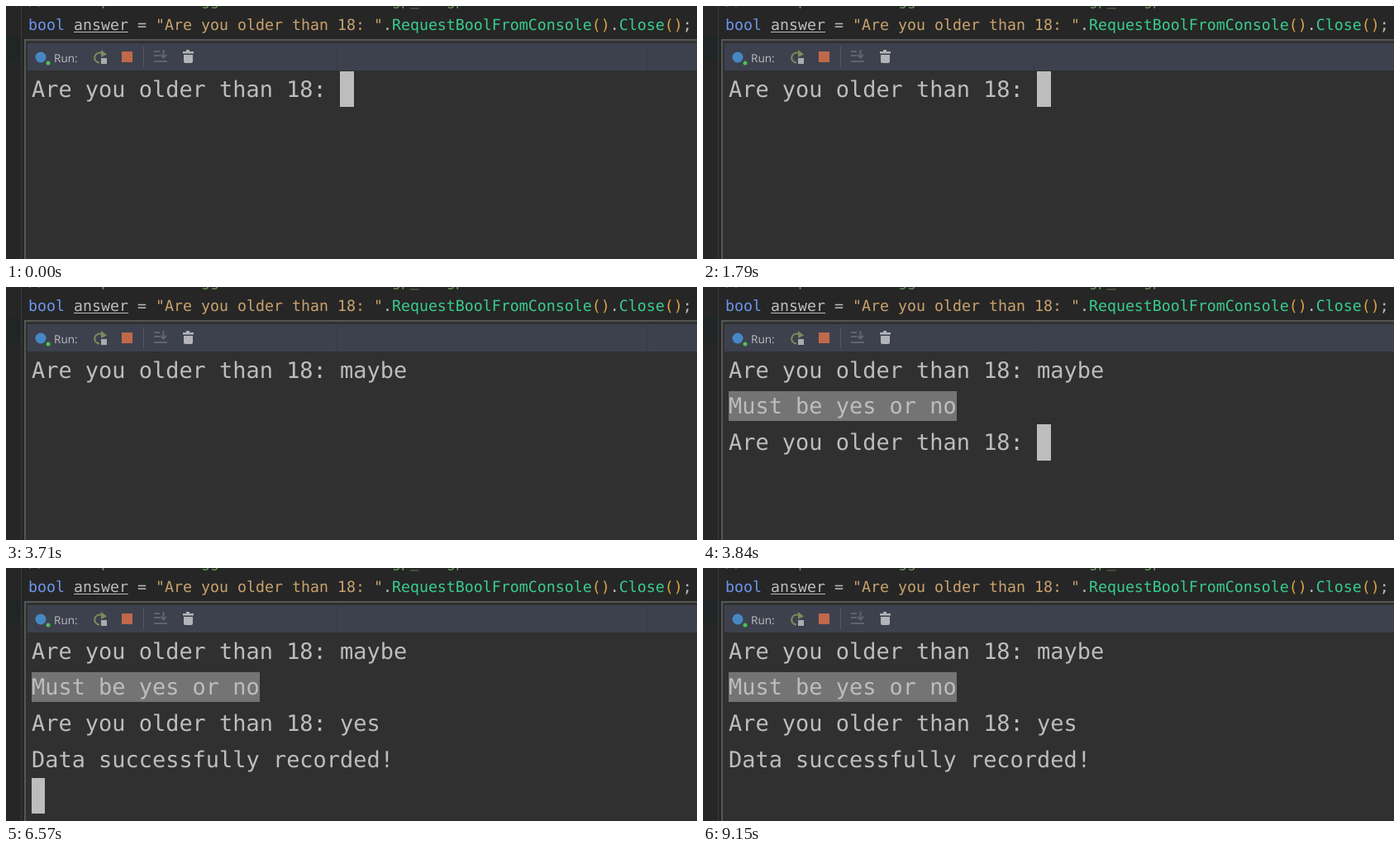
Recreate the animation shown at these times as an HTML page. Size 836 px wide and 306 px high, loop 9.22 s.

```html
<!DOCTYPE html>
<html lang="en">
<head>
<meta charset="utf-8">
<title>Console prompt</title>
<style>
  html, body { margin: 0; width: 100%; height: 100%; overflow: hidden; background: #262626; }
  svg { display: block; width: 836px; height: 306px; }
  text { white-space: pre; text-rendering: geometricPrecision; fill: #bdbdbd; }
  .code, .row { font-family: "DejaVu Sans Mono", monospace; }
  .code { font-size: 18.27px; }
  .row { font-size: 26.94px; }
  .label { font: 13.6px "Open Sans", "Noto Sans", sans-serif; }
  .keyword { fill: #6c95eb; }
  .string { fill: #c9a26d; }
  .method { fill: #39cc8f; }
  .paren { fill: #d9a343; }
  .comment { fill: #6f9a5c; }
</style>
</head>
<body>
<svg viewBox="0 0 836 306">
  <!-- editor -->
  <rect width="836" height="306" fill="#262626"/>
  <rect y="37" width="18" height="30" fill="#202626"/>
  <rect x="18" width="1" height="306" fill="#3b3b3b"/>
  <text class="code comment" x="27" y="-1">//      p          gg                   gp_   gp</text>
  <text class="code" x="27" y="29"><tspan class="keyword">bool</tspan> answer = <tspan class="string">"Are you older than 18: "</tspan>.<tspan class="method">RequestBoolFromConsole</tspan><tspan class="paren">()</tspan>.<tspan class="method">Close</tspan><tspan class="paren">()</tspan>;</text>
  <rect x="82" y="31" width="66" height="1" fill="#bdbdbd"/>

  <!-- console window -->
  <rect x="22" y="40" width="814" height="266" fill="#555656"/>
  <rect x="24" y="42" width="812" height="264" fill="#303030"/>
  <rect x="26" y="45" width="810" height="33" fill="#3d414e"/>
  <path d="M400.5 45V78M775.5 45V78" stroke="#373b47"/>

  <!-- toolbar -->
  <circle cx="42" cy="62" r="6.5" fill="#4688c4"/>
  <circle cx="51" cy="69" r="2.5" fill="#4fc04f"/>
  <text class="label" x="58" y="67.5">Run:</text>
  <g fill="none" stroke="#7d8a5c" stroke-width="2">
    <path d="M113 68.5A6 6 0 1 1 116.5 57.5"/>
  </g>
  <path d="M115 53L122 58.5L115 62Z" fill="#7d8a5c"/>
  <rect x="115" y="63" width="7" height="7" fill="#a9abad"/>
  <rect x="140" y="55" width="13" height="13" fill="#c0694a"/>
  <rect x="166" y="49" width="1" height="25" fill="#555962"/>
  <path d="M179 55H186M179 60H186M179 67H195M190.5 53V62M187 59L190.5 62.5L194 59" fill="none" stroke="#60646d" stroke-width="2"/>
  <path d="M214 55H218V53H222V55H227V57.5H214ZM215 59H226V67Q226 69 224 69H217Q215 69 215 67Z" fill="#b2b4b7"/>

  <!-- console output -->
  <rect id="mark" x="31" y="126" width="276" height="36" fill="#747474"/>
  <g id="rows"></g>
  <rect id="cursor" fill="#bdbdbd"/>
</svg>
<script>
  const LOOP = 9220;
  const ASK = "Are you older than 18: ";
  const RETRY = ASK + "maybe\nMust be yes or no\n" + ASK;
  const DONE = RETRY + "yes\nData successfully recorded!\n";

  // start time, console content, cursor shown
  const steps = [
    [0, ASK, 1], [200, ASK, 0], [730, ASK, 1], [1260, ASK, 0], [1790, ASK, 1],
    [1990, ASK + "m", 1], [2260, ASK + "ma", 1], [2590, ASK + "may", 1],
    [2920, ASK + "mayb", 1], [3180, ASK + "maybe", 1], [3710, ASK + "maybe", 0],
    [3840, RETRY, 1], [4830, RETRY, 0],
    [5290, RETRY + "y", 1], [5620, RETRY + "ye", 1], [5890, RETRY + "yes", 1],
    [6570, DONE, 1], [7030, DONE, 0], [7560, DONE, 1],
    [8090, DONE, 0], [8620, DONE, 1], [9150, DONE, 0]
  ];

  const colX = n => Math.ceil(30.75 + 16.225 * n);
  const rowY = n => Math.round(78.6 + 43.75 * n);
  const byId = id => document.getElementById(id);
  const mark = byId("mark"), cursor = byId("cursor");

  const set = (el, attrs) => {
    for (const name in attrs) el.setAttribute(name, attrs[name]);
    return el;
  };

  const rows = [0, 1, 2, 3].map(n => {
    const row = document.createElementNS("http://www.w3.org/2000/svg", "text");
    return byId("rows").appendChild(set(row, { class: "row", x: 31, y: rowY(n) + 31 }));
  });

  function draw([, content, on]) {
    const lines = content.split("\n");
    const last = lines.length - 1;
    const col = lines[last].length;
    rows.forEach((row, n) => { row.textContent = lines[n] || ""; });
    set(mark, { visibility: last > 0 ? "visible" : "hidden" });
    set(cursor, {
      x: colX(col), y: rowY(last),
      width: colX(col + 1) - colX(col), height: rowY(last + 1) - rowY(last),
      visibility: on ? "visible" : "hidden"
    });
  }

  const start = performance.now();
  let shown;
  function tick() {
    const t = (performance.now() - start) % LOOP;
    const step = steps.filter(s => s[0] <= t).pop();
    if (step !== shown) draw(shown = step);
    requestAnimationFrame(tick);
  }
  tick();
</script>
</body>
</html>
```
